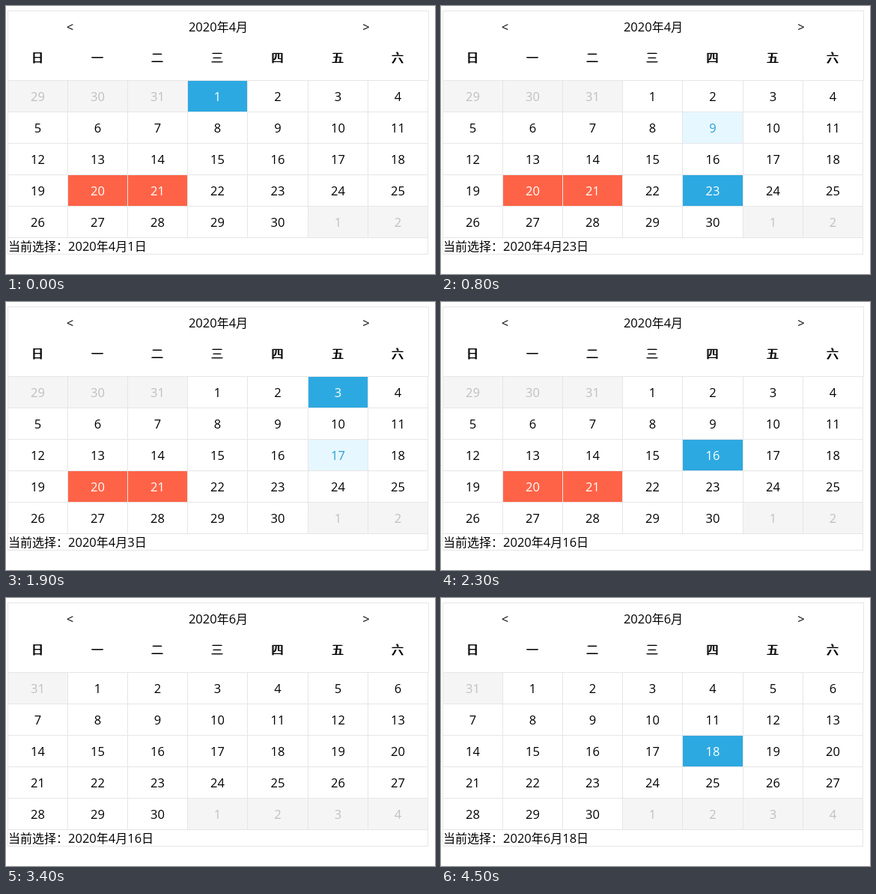
Animation of 573x358 px, one loop 5.1 s. Source, as an HTML page:

```html
<!DOCTYPE html>
<html lang="zh-CN">
<head>
<meta charset="utf-8">
<title>日历</title>
<style>
html, body { margin: 0; width: 100%; height: 100%; overflow: hidden; background: #fff; }
svg { display: block; }
text { font: 16px "Noto Sans CJK SC", "Noto Sans CJK", sans-serif; white-space: pre; }
.num { font-family: "Open Sans", "Noto Sans", sans-serif; font-size: 16.5px; }
rect { shape-rendering: crispEdges; }
</style>
</head>
<body>
<svg id="stage" width="573" height="358" viewBox="0 0 573 358"></svg>
<script>
const LOOP = 5100, YEAR = 2020, LINE = '#e6e6e6';
const COLS = [2, 82, 162, 242, 322, 403, 483, 563], TOP = 99, ROW = 42;
const MARKED = { 4: [20, 21] };
const STYLES = {
  plain: ['#fff', '#000'],
  other: ['#f5f5f5', '#c0c0c0'],
  marked: ['#ff6347', '#fff'],
  chosen: ['#2da9e1', '#fff'],
  hover: ['#e6f7ff', '#2c9fd0']
};

// [time, action, value]; a click chooses the hovered day
const EVENTS = [
  [200, 'hover', 10], [300, 'hover', 17], [400, 'hover', 23], [600, 'click'],
  [700, 'hover', 16], [800, 'hover', 9], [1000, 'click'],
  [1100, 'hover', 3], [1300, 'click'], [1500, 'hover', 2],
  [1800, 'hover', 9], [1900, 'hover', 17], [2000, 'hover', 16], [2100, 'click'],
  [2300, 'hover', 0], [2800, 'month', 5], [3400, 'month', 6],
  [3600, 'hover', 5], [3800, 'click'], [3900, 'hover', 11],
  [4000, 'hover', 18], [4100, 'click'], [4400, 'hover', 6], [4500, 'hover', 0]
];

const stage = document.getElementById('stage');

function stateAfter(count) {
  const s = { month: 4, hover: 0, chosen: { month: 4, day: 1 } };
  for (const [, action, value] of EVENTS.slice(0, count)) {
    if (action === 'hover') s.hover = value;
    else if (action === 'click') s.chosen = { month: s.month, day: s.hover };
    else { s.month = value; s.hover = 0; }
  }
  return s;
}

const rect = (x, y, w, h, fill) =>
  `<rect x="${x}" y="${y}" width="${w}" height="${h}" fill="${fill}"/>`;

function text(x, y, str, fill = '#000', anchor = 'middle') {
  const body = String(str).replace(/[<>]/g, c => c === '<' ? '&lt;' : '&gt;')
    .replace(/\d+|&[lg]t;/g, '<tspan class="num">$&</tspan>');
  return `<text x="${x}" y="${y}" fill="${fill}" text-anchor="${anchor}">${body}</text>`;
}

const middle = col => (COLS[col] + COLS[col + 1] + 1) / 2;

function header(month) {
  let out = rect(2, 6, 563, 1, LINE) + rect(2, 6, 1, 94, LINE) + rect(564, 6, 1, 94, LINE);
  out += text(85.5, 34, '<') + text(283.5, 34, `${YEAR}年${month}月`) + text(481, 34, '>');
  // doubled sideways: heavy uprights, thin horizontals
  [...'日一二三四五六'].forEach((name, col) => {
    for (const dx of [-0.5, 0.5]) out += text(middle(col) + dx - 0.5, 75, name);
  });
  return out;
}

function cellStyle(s, day, inMonth) {
  if (!inMonth) return 'other';
  if (day === s.hover) return 'hover';
  if (s.month === s.chosen.month && day === s.chosen.day) return 'chosen';
  return (MARKED[s.month] || []).includes(day) ? 'marked' : 'plain';
}

function grid(s, rows) {
  const first = new Date(YEAR, s.month - 1, 1).getDay();
  let out = '';
  for (let i = 0; i < rows * 7; i++) {
    const date = new Date(YEAR, s.month - 1, i - first + 1), day = date.getDate();
    const [fill, ink] = STYLES[cellStyle(s, day, date.getMonth() === s.month - 1)];
    const col = i % 7, y = TOP + Math.floor(i / 7) * ROW;
    out += rect(COLS[col] + 1, y + 1, COLS[col + 1] - COLS[col] - 1, ROW - 1, fill);
    out += text(middle(col), y + 28, day, ink);
  }
  for (let r = 0; r <= rows; r++) out += rect(2, TOP + r * ROW, 562, 1, LINE);
  for (const x of COLS) out += rect(x, TOP, 1, rows * ROW + 1, LINE);
  return out;
}

function footer({ month, day }, y) {
  return rect(2, y, 1, 23, LINE) + rect(563, y, 1, 23, LINE) + rect(2, y + 22, 562, 1, LINE) +
    text(3, y + 18, `当前选择：${YEAR}年${month}月${day}日`, '#000', 'start');
}

function draw(s) {
  const first = new Date(YEAR, s.month - 1, 1).getDay();
  const rows = Math.ceil((first + new Date(YEAR, s.month, 0).getDate()) / 7);
  stage.innerHTML = header(s.month) + grid(s, rows) + footer(s.chosen, TOP + rows * ROW);
}

let shown = -1;
const start = performance.now();
function tick() {
  const t = (performance.now() - start) % LOOP;
  const count = EVENTS.filter(e => e[0] <= t).length;
  if (count !== shown) draw(stateAfter(shown = count));
  requestAnimationFrame(tick);
}
tick();
</script>
</body>
</html>
```
